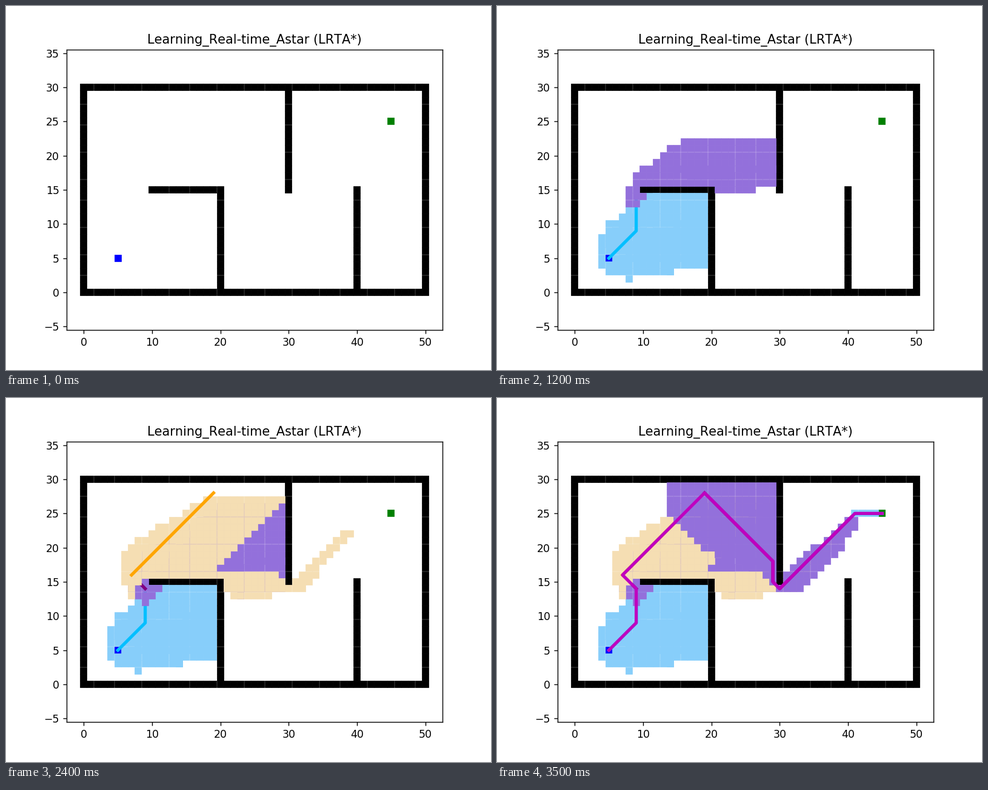
Animation, 800 px wide and 600 px high, one loop 3.6 s. Source, as a matplotlib script:

```python
import itertools
import math

import matplotlib.pyplot as plt
from matplotlib.animation import FuncAnimation

plt.rcParams["text.kerning_factor"] = 6

START, GOAL = (5, 5), (45, 25)
WIDTH, HEIGHT = 51, 31
MOVES = [(-1, 0), (-1, 1), (0, 1), (1, 1), (1, 0), (1, -1), (0, -1), (-1, -1)]
EXPANSIONS = 250   # queue entries expanded per planning round
BATCH = 40         # nodes shown per animation step
FRAMES, INTERVAL = 36, 100

COLORS = [
    ("lightskyblue", "deepskyblue"),
    ("mediumpurple", "purple"),
    ("wheat", "orange"),
    ("mediumpurple", "purple"),
    ("lightskyblue", "deepskyblue"),
]


def build_walls():
    walls = {(x, y) for x in range(WIDTH) for y in (0, HEIGHT - 1)}
    walls |= {(x, y) for x in (0, WIDTH - 1) for y in range(HEIGHT)}
    walls |= {(x, 15) for x in range(10, 21)}
    walls |= {(20, y) for y in range(15)}
    walls |= {(30, y) for y in range(15, 30)}
    walls |= {(40, y) for y in range(16)}
    return walls


WALLS = build_walls()


def dist(a, b):
    return math.hypot(b[0] - a[0], b[1] - a[1])


def neighbors(s):
    cells = [(s[0] + dx, s[1] + dy) for dx, dy in MOVES]
    return [c for c in cells if c not in WALLS]


def search(start, h):
    """Limited A*: return the expanded nodes and, if reached, the path."""
    # A plain list keeps outdated entries; they count as expansions too.
    queue = [(h[start], start)]
    cost, parent = {start: 0.0}, {}
    order, closed = [], set()
    while queue and len(order) < EXPANSIONS:
        entry = min(queue)
        queue.remove(entry)
        s = entry[1]
        order.append(s)
        closed.add(s)
        if s == GOAL:
            path = [s]
            while path[-1] != start:
                path.append(parent[path[-1]])
            return order, path[::-1]
        for n in neighbors(s):
            new = cost[s] + dist(s, n)
            if n not in closed and new < cost.get(n, math.inf):
                cost[n], parent[n] = new, s
                queue.append((new + h[n], n))
    return order, None


def learn(order, h):
    """Raise the estimates of the expanded nodes until they settle."""
    local = dict.fromkeys(order, math.inf)
    changed = True
    while changed:
        changed = False
        for s in local:
            best = min(dist(s, n) + local.get(n, h[n]) for n in neighbors(s))
            if best != local[s]:
                local[s], changed = best, True
    h.update(local)
    return local


def descend(start, local, h):
    path = [start]
    while path[-1] in local:
        path.append(min(neighbors(path[-1]), key=h.get))
    return path


def plan():
    h = {c: dist(c, GOAL)
         for c in itertools.product(range(WIDTH), range(HEIGHT))}
    start, rounds = START, []
    while len(rounds) < len(COLORS):
        order, path = search(start, h)
        found = path is not None
        if not found:
            path = descend(start, learn(order, h), h)
        rounds.append(([c for c in order if c not in (START, GOAL)], path))
        if found:
            break
        start = path[-1]
    return rounds


fig, ax = plt.subplots(figsize=(6.4, 4.8), dpi=125)
fig.subplots_adjust(left=0.125, right=0.9, bottom=0.11, top=0.88)


def squares(cells, color):
    return ax.plot(*zip(*cells), "s", color=color)[0]


def route(path, color):
    return ax.plot(*zip(*path), color=color, linewidth=3)[0]


squares([START], "b")
squares([GOAL], "g")
squares(sorted(WALLS), "k")
ax.set_title("Learning_Real-time_Astar (LRTA*)")

# Each step adds one artist on top of the earlier ones.
steps = []
full_path = []
for (cells, path), (fill, stroke) in zip(plan(), COLORS):
    for i in range(0, len(cells), BATCH):
        steps.append(squares(cells[i:i + BATCH], fill))
    steps.append(route(path, stroke))
    full_path += path
steps.append(route(full_path, "m"))

half = 27.5 * (0.77 * 4.8) / (0.775 * 6.4)
ax.set_xlim(-2.5, 52.5)
ax.set_ylim(15 - half, 15 + half)


def update(frame):
    for k, artist in enumerate(steps, start=1):
        artist.set_visible(k <= frame)
    return steps


anim = FuncAnimation(fig, update, frames=FRAMES, interval=INTERVAL,
                     repeat=True, repeat_delay=0, blit=False)
plt.show()
```
